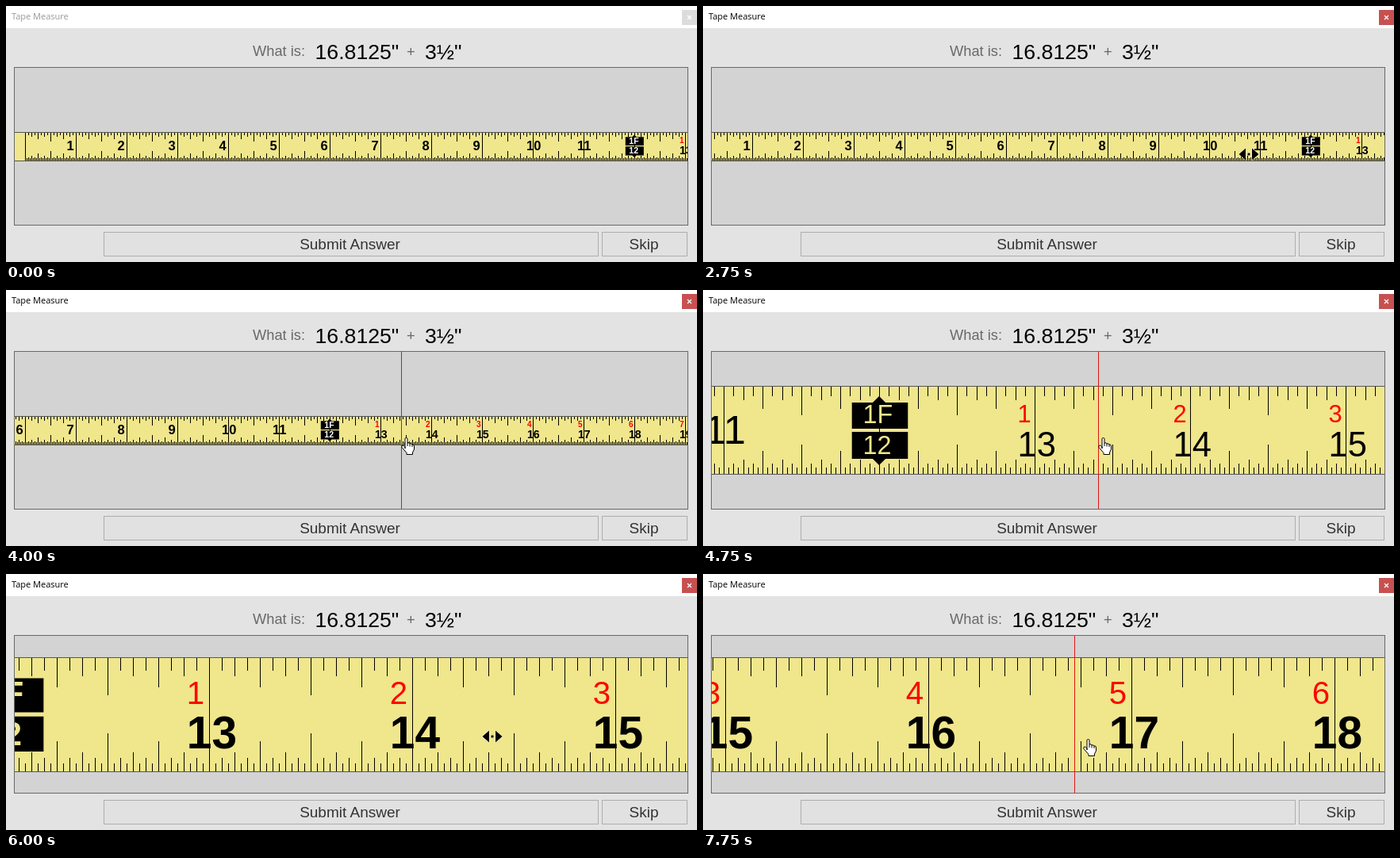
These frames come from a looping animation (871 by 323 pixels, 8000 ms). An HTML page:

```html
<!DOCTYPE html>
<html lang="en">
<head>
<meta charset="utf-8">
<title>Tape Measure</title>
<style>
  html, body { margin: 0; width: 100%; height: 100%; overflow: hidden; background: #e3e3e3; }
  svg { display: block; font-family: "Liberation Sans", Arial, sans-serif; }
  .caption { font: 11px "Open Sans", sans-serif; }
  .label { font-size: 18.3px; fill: #696969; }
  .value { font-size: 26.67px; }
  .button rect { fill: #e1e1e1; stroke: #adadad; }
  .button text { font-size: 19px; fill: #333; text-anchor: middle; }
  .crisp { shape-rendering: crispEdges; }
</style>
</head>
<body>
<svg width="871" height="323" viewBox="0 0 871 323">
  <clipPath id="inside"><rect x="11" y="78" width="848" height="198"/></clipPath>
  <rect width="871" height="28" fill="#fff"/>
  <text id="caption" class="caption" x="7" y="17">Tape Measure</text>
  <rect id="close" x="852" y="5" width="19" height="19"/>
  <path d="M859 12l5 5m0-5l-5 5" stroke="#fff" stroke-width="1.2"/>

  <text class="label" x="311" y="63">What is:</text>
  <text class="value" x="389.5" y="67">16.8125"</text>
  <text class="label" x="505" y="64">+</text>
  <text class="value" x="528" y="67">3½"</text>

  <rect x="10.5" y="77.5" width="849" height="199" fill="#d3d3d3" stroke="#696969"/>
  <g id="tape" clip-path="url(#inside)"></g>
  <path id="guide" class="crisp" stroke="#dc1414"/>

  <g class="button">
    <rect x="123.5" y="285.5" width="623" height="30"/><text x="433.5" y="307">Submit Answer</text>
    <rect x="751.5" y="285.5" width="107" height="30"/><text x="804" y="307">Skip</text>
  </g>

  <g id="hand" stroke="#000" stroke-linejoin="round">
    <path d="M5 14V2Q5 .5 6.5 .5T8 2V7Q10.5 6 11 8Q13.5 7.2 14 9Q16.5 8.5 16.5 11V15L14.5 19V21.5H7V19.5L1 12.5Q0 10.5 2 10Q3.5 10 5 12Z" fill="#fff"/>
    <path d="M8 7V11M11 8V11.5M14 9V12" fill="none"/>
  </g>
  <path id="grip" d="M-12.5 0L-4-7.5V7.5ZM12.5 0L4-7.5V7.5ZM-1.5-1.5h3v3h-3z" stroke="#fff" paint-order="stroke"/>
</svg>
<script>
const STEP = 250, STEPS = 32, MID = 176.5, ANCHOR = 498;
const $ = id => document.getElementById(id);

// Pointer path: step, x, y, distance of the guide line behind the pointer
const path = [
  [2, 443, 266, 6], [6, 501, 200, 6], [7, 612, 152, 8], [8, 690, 165, 8], [9, 722, 182, 6],
  [10, 714, 186, 6], [11, 688, 187, 6], [14, 330, 190, 6], [15, 430, 188, 8], [16, 504, 186, 6],
  [21, 504, 186, 6], [22, 620, 195, 8], [23, 751, 205, 6], [24, 613, 205, 6], [26, 145, 208, 6],
  [27, 400, 210, 10], [28, 510, 210, 6], [30, 238, 210, 6], [31, 485, 208, 17]
];
const drags = [[10, 14], [23, 26], [28, 30]];

function pointer(step) {
  const i = Math.max(1, path.findIndex(row => row[0] >= step));
  const [a, b] = [path[i - 1], path[i]];
  const k = (step - a[0]) / (b[0] - a[0]);
  return a.slice(1).map((v, j) => Math.round(v + (b[j + 1] - v) * k));
}

const inchAt = step => step < 17 ? 64 : step < 19 ? 136 : step < 21 ? 196 : 256;

// Screen x of the tape's zero mark
function originAt(step) {
  let origin = 24;
  drags.forEach(([start, end], i) => {
    if (step >= start) origin += pointer(Math.min(step, end))[0] - pointer(start)[0];
    if (i === 0) origin = ANCHOR + (origin - ANCHOR) * inchAt(step) / 64;
  });
  return Math.round(origin);
}

function tickLength(k) {
  const sizes = [[16, .187], [8, .148], [4, .094], [2, .066], [1, .04]];
  return sizes.find(([n]) => k % n === 0)[1];
}

function tapeMarkup(origin, inch) {
  const half = inch * 9 / 32, top = Math.round(MID - half), bottom = Math.round(MID + half);
  const small = inch < 100, bold = small || inch === 256;
  const text = (s, x, dy, size, fill, heavy) =>
    `<text x="${x}" y="${MID + dy * inch}" font-size="${size * inch}" fill="${fill}" font-weight="${heavy ? 700 : 400}">${s}</text>`;
  let ticks = '', marks = '';

  const first = Math.max(0, Math.floor((11 - origin) / inch * 32));
  const last = Math.ceil((859 - origin) / inch * 32);
  for (let k = first; k <= last; k++) {
    const x = Math.round(origin + k * inch / 32) + .5;
    if (k % 32 === 0) { ticks += `M${x} ${top}V${bottom}`; continue; }
    const length = Math.round(tickLength(k) * inch);
    if (k % 2 === 0) ticks += `M${x} ${top}v${length}`;
    ticks += `M${x} ${bottom}v${-length}`;
  }

  for (let n = Math.max(1, Math.floor(first / 32)); n <= last / 32 + 1; n++) {
    const x = origin + n * inch;
    if (n < 12) {
      marks += text(n, x - inch * (n < 10 ? .178 : .125), .088, .258, '#000', bold);
    } else if (n === 12) {
      const box = (y, h) => `M${x - .175 * inch} ${MID + y * inch}h${.36 * inch}v${h * inch}h${-.36 * inch}z`;
      const arrow = (y, h) => `M${x - .041 * inch} ${MID + y * inch}h${.082 * inch}l${-.041 * inch} ${h * inch}z`;
      marks += `<path d="${box(-.176, .168)}${box(.013, .173)}${arrow(-.176, -.041)}${arrow(.186, .041)}"/>`;
      const ink = small ? '#fff' : '#f0e68c';
      marks += text('1F', x - .105 * inch, -.045, .165, ink, bold) + text('12', x - .105 * inch, .156, .165, ink, bold);
    } else {
      marks += text(n - 12, x - .11 * inch, -.05, .157, '#f00', small);
      marks += text(n, x - .11 * inch, .17, .222, '#000', bold);
    }
  }
  return `<rect x="0" y="${top}" width="871" height="${bottom - top}" fill="#f0e68c"/>
    <path class="crisp" d="${ticks}" stroke="#000"/>
    <path class="crisp" d="M0 ${top + .5}H871M0 ${bottom + .5}H871" stroke="#555"/>${marks}`;
}

function draw(step) {
  const active = step >= 10, shown = step >= 2;
  const dragging = drags.some(([start, end]) => step >= start && step <= end);
  const show = (id, on) => $(id).setAttribute('visibility', on ? 'visible' : 'hidden');
  $('caption').setAttribute('fill', active ? '#000' : '#999');
  $('close').setAttribute('fill', active ? '#c75050' : '#dcdcdc');
  $('tape').innerHTML = tapeMarkup(originAt(step), inchAt(step));

  show('hand', shown && !dragging);
  show('guide', shown && !dragging);
  show('grip', dragging);
  const [x, y, lag] = pointer(Math.max(2, step));
  $('hand').setAttribute('transform', `translate(${x - 6} ${y})`);
  $('grip').setAttribute('transform', `translate(${x} ${y})`);
  $('guide').setAttribute('d', `M${x - lag + .5} 78V276`);
}

let current = -1;
function tick() {
  const step = Math.floor(performance.now() / STEP) % STEPS;
  if (step !== current) draw(current = step);
  requestAnimationFrame(tick);
}
tick();
</script>
</body>
</html>
```
